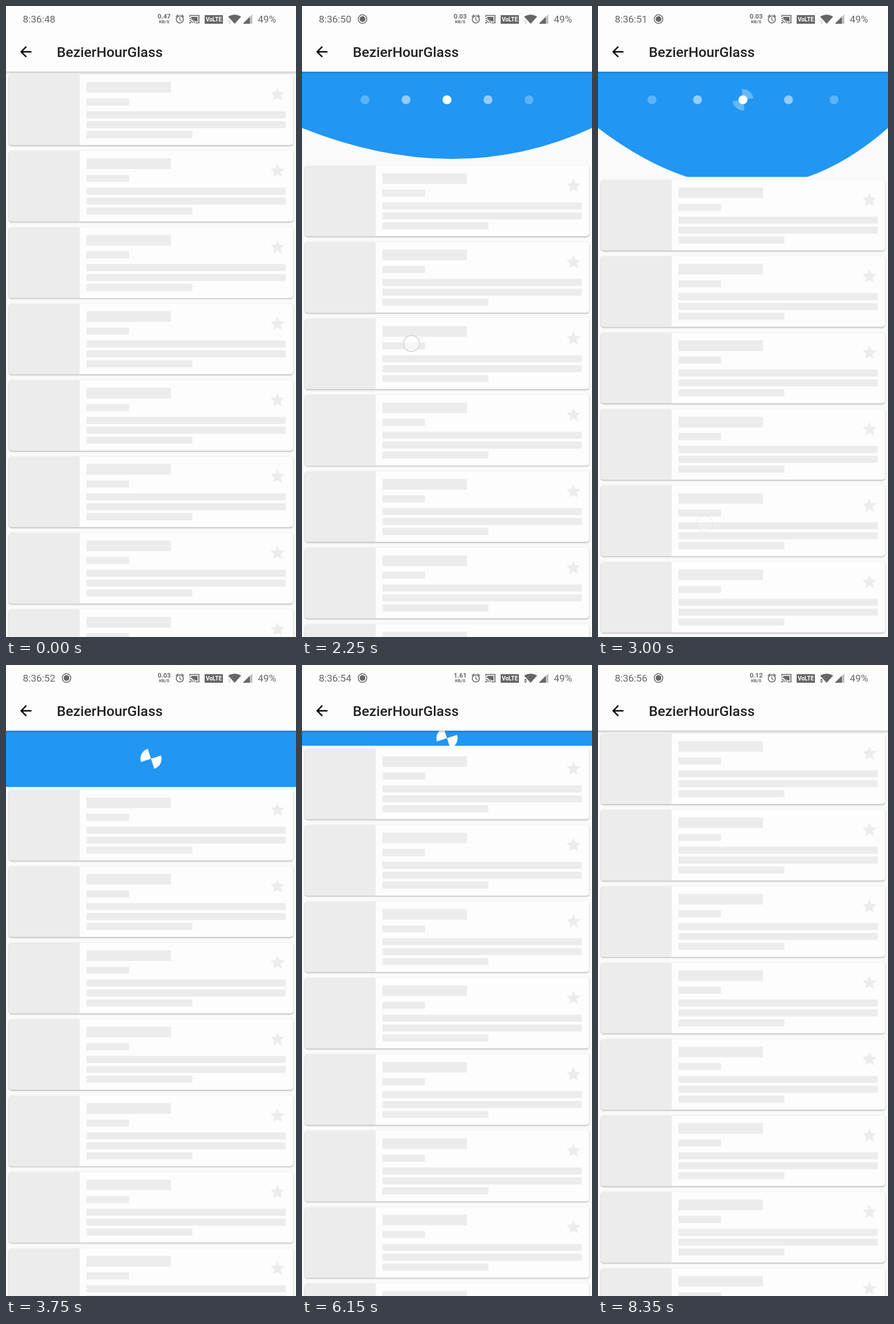
These frames come from a looping animation (508 px wide and 1102 px high, 8450 ms). An HTML page with a canvas:

```html
<!DOCTYPE html>
<html lang="en">
<head>
<meta charset="utf-8">
<title>BezierHourGlass</title>
<style>
  html, body { margin: 0; width: 100%; height: 100%; overflow: hidden; background: #fdfdfd; }
  canvas { display: block; width: 508px; height: 1102px; }
</style>
</head>
<body>
<canvas id="stage" width="508" height="1102"></canvas>
<script>
const ctx = document.getElementById('stage').getContext('2d');
const W = 508, H = 1102, LOOP = 8450, STEP = 50;
const TOP = 114.5, HEAD = 98.5, DP = 1.2347;
const CARD_H = 123.6, PITCH = 133.45;
const BLUE = '#2196f3', BG = '#fafafa', SURFACE = '#fdfdfd', BAR = '#ececec', ICON = '#666';
const FONT = 'Roboto, sans-serif';

const DRAG = 1690, DRAG_MS = 1070, RELEASE = 2890, COLLAPSE = 5950;
const SPIN = 2652, SPIN_MS = 1200;
const MAX_PULL = 250, BOUNCE = 136, BOUNCE_MS = 709;

const ARROW = new Path2D('M20 11H7.83l5.59-5.59L12 4l-8 8 8 8 1.41-1.41L7.83 13H20z');
const STAR = new Path2D('M12 17.27L18.18 21l-1.64-7.03L22 9.24l-7.19-.61L12 2 9.19 8.63 2 9.24l5.46 4.73L5.82 21z');

const clamp = (v, a = 0, b = 1) => Math.min(b, Math.max(a, v));
const smooth = p => p * p * (3 - 2 * p);
const dragPart = t => smooth(clamp((t - DRAG) / DRAG_MS));

// Overdamped spring from 1 to 0, starting at rest
function spring(ms) {
  const s = ms / 1000, a = 9.07, b = 22;
  return (b * Math.exp(-a * s) - a * Math.exp(-b * s)) / (b - a);
}

// cubic-bezier(0, 0, .58, 1)
function easeOut(x) {
  let lo = 0, hi = 1;
  for (let i = 0; i < 24; i++) {
    const s = (lo + hi) / 2;
    if (1.74 * s * s - 0.74 * s * s * s < x) lo = s; else hi = s;
  }
  return smooth(lo);
}

// Distance by which the list is pulled down
function pullAt(t) {
  if (t < DRAG) return 0;
  if (t < RELEASE) {
    const s = dragPart(t);
    return 381.5 * s / (1 + 0.526 * s);
  }
  if (t < COLLAPSE) return HEAD + (MAX_PULL - HEAD) * spring(t - RELEASE);
  const rest = HEAD * spring(t - COLLAPSE);
  return rest < 0.5 ? 0 : rest;
}

// Height of the curve's control point below the header
function waveAt(t, pull) {
  if (t < RELEASE) return 1.78 * Math.max(0, pull - HEAD);
  const start = 1.78 * (MAX_PULL - HEAD);
  const run = clamp((t - RELEASE) / BOUNCE_MS) * (start + BOUNCE);
  if (run < start) return start - run;
  const v = run - start;
  return v < 98 ? -Math.min(v, 98 - v) : -Math.min(v - 98, BOUNCE - v);
}

function rect(x, y, w, h, color) {
  ctx.fillStyle = color;
  ctx.fillRect(x, y, w, h);
}

function disc(x, y, r, color) {
  ctx.fillStyle = color;
  ctx.beginPath();
  ctx.arc(x, y, r, 0, 7);
  ctx.fill();
}

function ring(x, y, r, width, color) {
  ctx.strokeStyle = color;
  ctx.lineWidth = width;
  ctx.beginPath();
  ctx.arc(x, y, r, 0, 7);
  ctx.stroke();
}

function poly(points, color) {
  ctx.fillStyle = color;
  ctx.beginPath();
  points.forEach(([x, y]) => ctx.lineTo(x, y));
  ctx.fill();
}

function line(points, width, color) {
  ctx.strokeStyle = color;
  ctx.lineWidth = width;
  ctx.beginPath();
  points.forEach(([x, y], i) => i ? ctx.lineTo(x, y) : ctx.moveTo(x, y));
  ctx.stroke();
}

function text(str, x, y, font, color, align = 'left') {
  ctx.font = font + ' ' + FONT;
  ctx.textAlign = align;
  ctx.fillStyle = color;
  ctx.fillText(str, x, y);
}

function glyph(path, x, y, color) {
  ctx.save();
  ctx.translate(x, y);
  ctx.scale(DP, DP);
  ctx.fillStyle = color;
  ctx.fill(path);
  ctx.restore();
}

function card(y) {
  ctx.save();
  ctx.shadowColor = 'rgba(0,0,20,.32)';
  ctx.shadowBlur = 2.5;
  ctx.shadowOffsetY = 1.2;
  ctx.fillStyle = SURFACE;
  ctx.beginPath();
  ctx.roundRect(5, y, 498, CARD_H, 5);
  ctx.fill();
  ctx.restore();

  ctx.save();
  ctx.clip();
  rect(5, y, 124, CARD_H, BAR);
  ctx.restore();
  rect(141, y + 13.5, 148, 18.5, BAR);
  rect(141, y + 42, 74.5, 12.3, BAR);
  rect(141, y + 64.4, 349, 12.3, BAR);
  rect(141, y + 81.7, 349, 12.3, BAR);
  rect(141, y + 99, 185.5, 12.3, BAR);
  glyph(STAR, 460.7, y + 20, BAR);
}

function header(t, pull) {
  const height = Math.min(pull, HEAD), base = TOP + height, mid = TOP + height / 2;
  ctx.save();
  ctx.beginPath();
  ctx.rect(0, TOP, W, pull);
  ctx.clip();

  // the curve hangs slightly right of centre
  ctx.fillStyle = BLUE;
  ctx.beginPath();
  ctx.moveTo(0, TOP);
  ctx.lineTo(0, base);
  ctx.quadraticCurveTo(272, base + waveAt(t, pull), W, base);
  ctx.lineTo(W, TOP);
  ctx.fill();

  const fade = 1 - clamp((t - 3000) / 200);
  const gap = 21 + 0.319 * pull;
  for (let i = -2; i <= 2; i++) {
    ctx.globalAlpha = fade * [1, 0.52, 0.27][Math.abs(i)];
    disc(W / 2 + i * gap, mid, 7.8, '#fff');
  }

  ctx.globalAlpha = clamp((t - RELEASE) / 350);
  const turn = 8 * Math.PI * easeOut(Math.max(0, t - SPIN) % SPIN_MS / SPIN_MS);
  ctx.fillStyle = SURFACE;
  for (const a of [turn, turn + Math.PI]) {
    ctx.beginPath();
    ctx.moveTo(W / 2, mid);
    ctx.arc(W / 2, mid, 18.5, a, a + Math.PI / 2);
    ctx.fill();
  }
  ctx.restore();
}

function pointer(t) {
  if (t < DRAG) return;
  const alpha = 1 - clamp((t - RELEASE) / 150);
  if (!alpha) return;
  const s = dragPart(t), y = 227 + 677 * s, x = 197.5 - 10.5 * s;
  ctx.save();
  ctx.globalAlpha = alpha;
  disc(x, y, 14, 'rgba(255,255,255,.55)');
  ring(x, y, 14, 1.6, '#d3d3e0');
  ctx.restore();
}

function statusIcons(t) {
  // alarm
  ring(304.5, 23.5, 6.2, 1.6, ICON);
  line([[304.5, 19.5], [304.5, 24], [307.5, 26]], 1.3, ICON);
  line([[297.5, 18.8], [301.5, 15.4]], 1.6, ICON);
  line([[311.5, 18.8], [307.5, 15.4]], 1.6, ICON);

  // cast, with its screen filled in
  line([[322, 19.5], [322, 16.5], [338, 16.5], [338, 29.5], [332, 29.5]], 1.6, ICON);
  poly([[324.5, 19], [335.5, 19], [335.5, 27], [332, 27], [324.5, 20.5]], ICON);
  for (const r of [5, 8.5]) {
    ctx.lineWidth = 1.5;
    ctx.beginPath();
    ctx.arc(321.5, 30, r, -Math.PI / 2, 0);
    ctx.stroke();
  }
  disc(322.5, 29, 1.6, ICON);

  // network badge
  rect(348, 16, 32, 15, ICON);
  text('VoLTE', 364, 27.2, 'bold 10px', '#fff', 'center');

  // wifi and its traffic arrows
  ctx.fillStyle = ICON;
  ctx.beginPath();
  ctx.moveTo(400.5, 31);
  ctx.lineTo(389, 18.5);
  ctx.quadraticCurveTo(400.5, 11.5, 412, 18.5);
  ctx.fill();
  const busy = t >= 4250 ? ICON : '#d2d2d2';
  poly([[389, 27], [391.5, 23.8], [394, 27]], busy);
  poly([[389, 28.3], [391.5, 31.5], [394, 28.3]], busy);

  // signal
  poly([[415, 31], [431.5, 14.5], [431.5, 31]], '#bdbdbd');
  poly([[415, 31], [427, 19], [427, 31]], ICON);
}

function topBar(t) {
  rect(0, 0, W, TOP, SURFACE);
  const shade = ctx.createLinearGradient(0, TOP, 0, TOP + 5);
  shade.addColorStop(0, 'rgba(0,0,20,.2)');
  shade.addColorStop(1, 'rgba(0,0,20,0)');
  rect(0, TOP, W, 5, shade);

  const second = 48 + Math.floor((t + 600) / 1000);
  text('8:36:' + second, 29.5, 29.3, '17.3px', ICON);
  if (t >= 200) {
    ring(106, 22.8, 7.6, 1.5, ICON);
    disc(106, 22.8, 5, ICON);
  }
  const speed = t < 250 ? '0.47' : t < 4250 ? '0.03' : t < 8250 ? '1.61' : '0.12';
  text(speed, 277, 22.3, 'bold 11.3px', ICON, 'center');
  text('KB/S', 277, 30.4, 'bold 8px', ICON, 'center');
  statusIcons(t);
  text('49%', 441, 29.3, '17.3px', ICON);

  glyph(ARROW, 19.9, 65.1, '#000');
  text('BezierHourGlass', 88.9, 88.5, '500 24.7px', '#212121');
}

function draw(t) {
  const pull = pullAt(t);
  rect(0, 0, W, H, BG);
  if (pull > 0) header(t, pull);
  for (let i = 0; i < 8; i++) card(119.4 + pull + i * PITCH);
  topBar(t);
  pointer(t);
}

function tick(now) {
  draw(Math.floor(now % LOOP / STEP) * STEP);
  requestAnimationFrame(tick);
}

draw(0);
requestAnimationFrame(tick);
</script>
</body>
</html>
```
